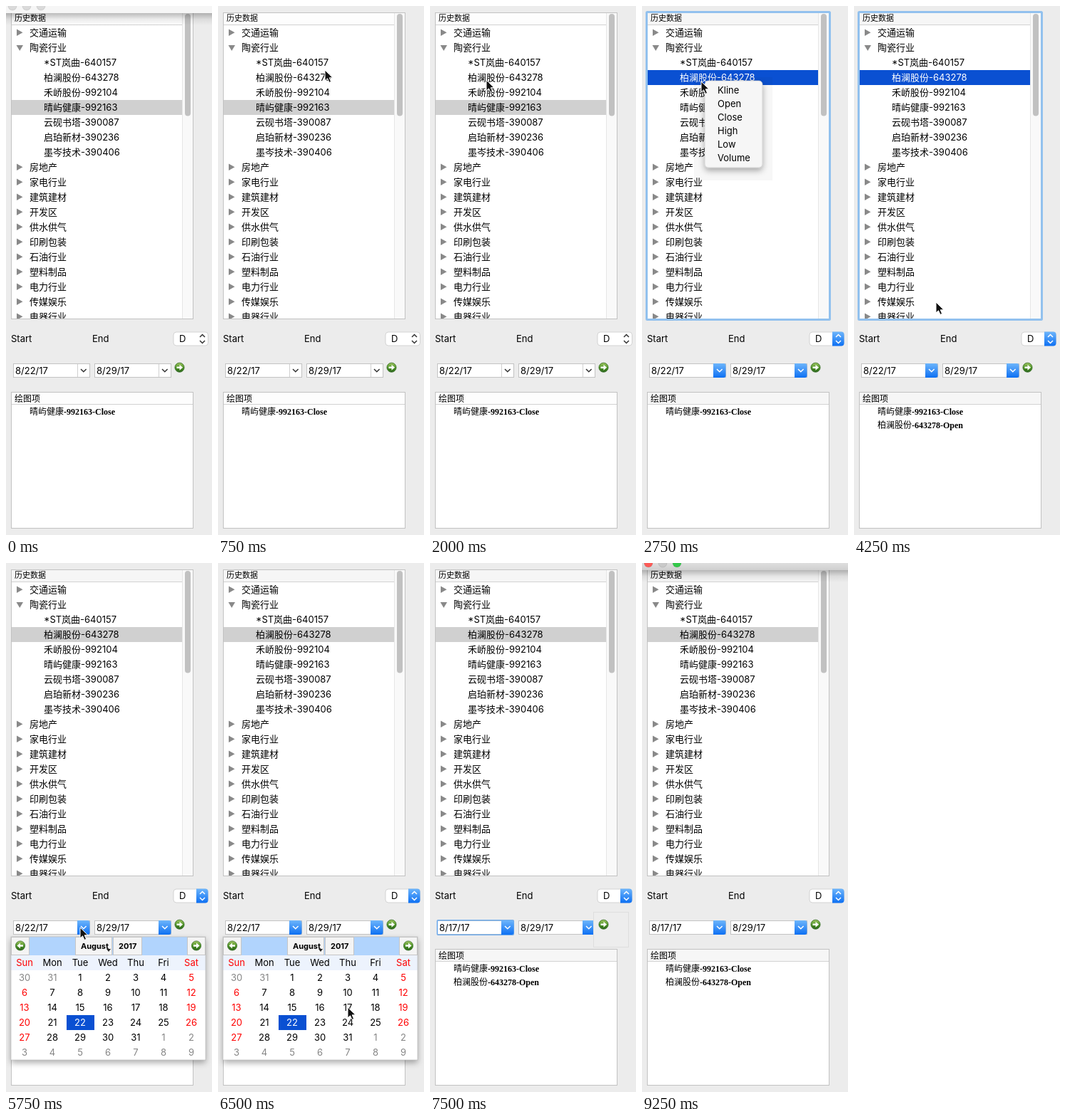
These frames come from a looping animation (289x743 px, 10000 ms). An HTML page:

```html
<!DOCTYPE html>
<html lang="zh-CN">
<head>
<meta charset="utf-8">
<title>历史数据</title>
<style>
html, body { margin: 0; width: 100%; height: 100%; overflow: hidden; background: #ececec; }
svg { display: block; width: 289px; height: 743px; }
text { font: 13px Inter, "Noto Sans CJK SC", "Noto Sans CJK", sans-serif; white-space: pre; }
.small { font-size: 11px; }
.bold { font-weight: 700; font-size: 11px; }
.serif { font: bold 12px "Liberation Serif", "Noto Sans CJK SC", "Noto Sans CJK", serif; }
.han { font-weight: 500; }
.mid { text-anchor: middle; }
</style>
</head>
<body>
<svg id="stage" viewBox="0 0 289 743">
  <defs>
    <linearGradient id="blue" x2="0" y2="1"><stop stop-color="#6db5fb"/><stop offset="1" stop-color="#0d70f3"/></linearGradient>
    <linearGradient id="green" x2="0" y2="1"><stop stop-color="#a3c765"/><stop offset=".5" stop-color="#4f9426"/><stop offset="1" stop-color="#286319"/></linearGradient>
    <linearGradient id="bar" x2="0" y2="1"><stop stop-color="#dedede"/><stop offset="1" stop-color="#cfcfcf"/></linearGradient>
    <linearGradient id="fade" x2="0" y2="1"><stop stop-opacity=".26"/><stop offset=".5" stop-opacity=".07"/><stop offset="1" stop-opacity="0"/></linearGradient>
    <filter id="shadow" x="-20%" y="-20%" width="140%" height="150%"><feDropShadow dx="0" dy="4" stdDeviation="4" flood-opacity=".33"/></filter>
    <clipPath id="listClip"><rect x="8" y="10" width="254" height="429"/></clipPath>
  </defs>
  <g id="scene"></g>
</svg>
<script>
const LOOP = 10000, STEP = 250;
const stocks = ["*ST岚曲-640157", "柏澜股份-643278", "禾峤股份-992104", "晴屿健康-992163",
  "云砚书塔-390087", "启珀新材-390236", "墨岑技术-390406"];
const sectors = ["房地产", "家电行业", "建筑建材", "开发区", "供水供气", "印刷包装",
  "石油行业", "塑料制品", "电力行业", "传媒娱乐", "电器行业"];
const tree = ["交通运输", "陶瓷行业", ...stocks, ...sectors];
const menuItems = ["Kline", "Open", "Close", "High", "Low", "Volume"];
const weekdays = ["Sun", "Mon", "Tue", "Wed", "Thu", "Fri", "Sat"];

// Pointer stops: time, x, y
const pointer = [
  [500, 214, 40], [750, 150, 90], [1000, 101, 128], [1250, 84, 146], [1500, 80, 130],
  [1750, 79, 112], [2000, 79, 104], [2250, 83, 106], [3000, 92, 115], [3250, 106, 132],
  [3500, 111, 141], [4000, 112, 250], [4250, 115, 416], [4500, 165, 480], [4750, 225, 505],
  [5000, 242, 508], [5250, 170, 512], [5500, 104, 512], [6000, 150, 590], [6250, 180, 620],
  [6500, 182, 624], [6750, 205, 560], [7000, 242, 510]
];

const rect = (x, y, w, h, fill, more = "") =>
  `<rect x="${x}" y="${y}" width="${w}" height="${h}" fill="${fill}" ${more}/>`;
const text = (x, y, s, cls = "", fill = "#000") =>
  `<text x="${x}" y="${y}" class="${cls}" fill="${fill}">${s}</text>`;
const path = (d, fill, more = "") => `<path d="${d}" fill="${fill}" ${more}/>`;
const line = (d, color, width = 1) => path(d, "none", `stroke="${color}" stroke-width="${width}"`);
const serifText = (x, y, s) =>
  text(x, y, s.replace(/\p{Script=Han}+/gu, '<tspan class="han">$&</tspan>'), "serif");
const headerFill = active => active ? "#f6f6f6" : "#fdfdfd";

function treeRow(label, i, selected, focused) {
  const y = 37 + 21 * i, leaf = i > 1 && i < 9, on = i === selected;
  const arrow = leaf ? "" : path(i === 1 ? `M14.5 ${y - 3}h9.5l-4.75 8z` : `M15 ${y - 4.5}v9.5l8.5-4.75z`, "#898989");
  return (on ? rect(8, y - 10, 239, 21, focused ? "#0a50d2" : "#d0d0d0") : "") + arrow +
    text(leaf ? 53 : 33, y + 5, label, "", on && focused ? "#fff" : "#000");
}

function list(selected, focused, active) {
  return rect(7.5, 9.5, 255, 430, "#fff", 'stroke="#c2c2c2"') +
    `<g clip-path="url(#listClip)">${tree.map((s, i) => treeRow(s, i, selected, focused)).join("")}</g>` +
    rect(8, 10, 239, 16, headerFill(active)) + line("M8 26.5H247", "#d2d2d2") + text(12, 21, "历史数据", "small") +
    rect(247, 10, 15, 429, "#f9f9f9") + line("M247.5 10V439", "#e6e6e6") +
    rect(251, 11, 8, 143.5, "#c1c1c1", 'rx="4"') +
    (focused ? rect(6.5, 8.5, 257, 432, "none", 'stroke="#92c1ee" stroke-width="3" rx="1"') : "");
}

function dateField(x, value, active, ring) {
  return rect(x + .5, 502.5, 107, 19, "#fff", 'stroke="#c3c3c3"') +
    (ring ? rect(x + .25, 501.75, 107, 20.5, "none", 'stroke="#6fabec" stroke-width="1.6" rx="1"') : "") +
    (active ? path(`M${x + 90} 502h14.5q3 0 3 3v14q0 3-3 3h-14.5z`, "url(#blue)") : line(`M${x + 90.5} 503v18`, "#cfcfcf")) +
    line(`M${x + 95} 510l3.8 3.8 3.8-3.8`, active ? "#fff" : "#333", 1.5) + text(x + 3, 517, value);
}

function periodBox(active) {
  return rect(235, 458, 48.5, 19, "#fff", 'rx="4" stroke="#cbcbcb" stroke-width=".8"') +
    (active ? path("M267 457.5h12.5q4 0 4 4v12q0 4-4 4h-12.5z", "url(#blue)") : "") +
    text(243, 472, "D") +
    line("M272 465l3.5-3.5 3.5 3.5M272 470l3.5 3.5 3.5-3.5", active ? "#fff" : "#333", 1.5);
}

const roundArrow = (x, y, dir) => `<g transform="translate(${x} ${y}) scale(${dir} 1)">
  <circle r="6.6" fill="url(#green)" stroke="#39702a" stroke-width=".8"/>
  <path d="M-4-1.2H0V-4L4.6 0 0 4V1.2H-4z" fill="#fff"/></g>`;

function plotPanel(items, active) {
  return rect(7.5, 542.5, 255, 191, "#fff", 'stroke="#c2c2c2"') + rect(8, 543, 254, 16, headerFill(active)) +
    line("M8 559.5H262", "#d2d2d2") + serifText(12, 556, "绘图项") +
    items.map((s, i) => serifText(33, 574 + 19 * i, s)).join("");
}

function menu(hover) {
  return rect(73, 100, 110, 145, "#000", 'opacity=".03"') +
    rect(88, 105, 81, 122, "#f6f6f6", 'rx="5" stroke="#c4c4c4" stroke-width=".7" filter="url(#shadow)"') +
    menuItems.map((s, i) => (i === hover ? rect(88, 109 + 19 * i, 81, 19, "#2c7cf6") : "") +
      text(106, 123 + 19 * i, s, "", i === hover ? "#fff" : "#000")).join("");
}

function calendar() {
  const weekendOr = (col, color) => col % 6 ? color : "#f00";
  let out = rect(7, 525, 273, 173, "#fff", 'filter="url(#shadow)"') + rect(7, 525, 273, 26, "#b1d4fd") +
    rect(7, 551, 273, 21, "#edf3fd");
  for (const [x, w] of [[7, 26], [97, 52], [150, 41], [254, 26]])
    out += rect(x + .5, 525.5, w - 1, 25, "#f4f4f4", 'stroke="#c5c5c5"');
  out += roundArrow(20, 537.5, -1) + roundArrow(267, 537.5, 1) + text(105, 542, "August", "bold") +
    path("M141 542h6l-3 4z", "#222") + text(158, 542, "2017", "bold");
  weekdays.forEach((s, c) => out += text(26 + 39 * c, 565.5, s, "mid", weekendOr(c, "#000")));
  for (let i = 0; i < 42; i++) {
    const col = i % 7, row = Math.floor(i / 7), date = new Date(2017, 6, 30 + i), day = date.getDate();
    const inside = date.getMonth() === 7, on = inside && day === 22;
    if (on) out += rect(7 + 39 * col, 572 + 21 * row, 39, 21, "#0a50d2");
    out += text(26 + 39 * col, 586.5 + 21 * row, day, "mid", on ? "#fff" : inside ? weekendOr(col, "#000") : "#858585");
  }
  return out + rect(7, 525, 273, 173, "none", 'stroke="#bdbdbd" stroke-width=".7"');
}

function titleBar(active) {
  const colors = active ? ["#fc5b57", "#c9c9c9", "#34c84a"] : ["#dadada", "#dadada", "#dadada"];
  return rect(0, 0, 289, 10, active ? "url(#bar)" : "#f6f6f6") +
    colors.map((c, i) => `<circle cx="${9 + 20 * i}" cy="0" r="6" fill="${c}" stroke="#000" stroke-opacity=".12" stroke-width=".8"/>`).join("") +
    rect(0, 10, 289, 17, "url(#fade)");
}

const cursor = ([, x, y]) => path("M0 0V15L3.5 11.8 6 17.4 8.6 16.3 6.2 10.8H11z", "#111",
  `stroke="#fff" stroke-width="1" stroke-linejoin="round" transform="translate(${x} ${y})"`);

function scene(t) {
  const during = (a, b) => t >= a && t < b;
  const active = t >= 2250;
  const at = during(500, 7500) && pointer.filter(p => p[0] <= t).pop();
  const items = [stocks[3] + "-Close"];
  if (t >= 3750) items.push(stocks[1] + "-Open");
  const hover = t >= 3000 && at ? Math.max(0, Math.round((at[2] - 118) / 19)) : -1;
  return rect(0, 0, 289, 743, "#ececec") +
    list(active ? 3 : 5, during(2250, 5250), active) +
    text(7, 472, "Start") + text(121, 472, "End") + periodBox(active) +
    dateField(10, t < 6750 ? "8/22/17" : "8/17/17", active, during(6750, 8750)) +
    dateField(124, "8/29/17", active) +
    (during(5000, 5250) || during(7000, 8750)
      ? rect(229.5, 490.5, 49, 49, "#ededed", 'stroke="#dedede"') : "") +
    roundArrow(243.5, 507.7, 1) + plotPanel(items, active) +
    (during(2750, 3500) ? menu(hover) : "") +
    (during(5500, 6750) ? calendar() : "") +
    (t < 500 || t >= 9250 ? titleBar(active) : "") +
    (at ? cursor(at) : "");
}

const root = document.getElementById("scene"), start = performance.now();
let shown = -1;
function render(now) {
  const t = Math.floor((Math.max(0, now - start) % LOOP) / STEP) * STEP;
  if (t !== shown) root.innerHTML = scene(shown = t);
  requestAnimationFrame(render);
}
render(start);
</script>
</body>
</html>
```
